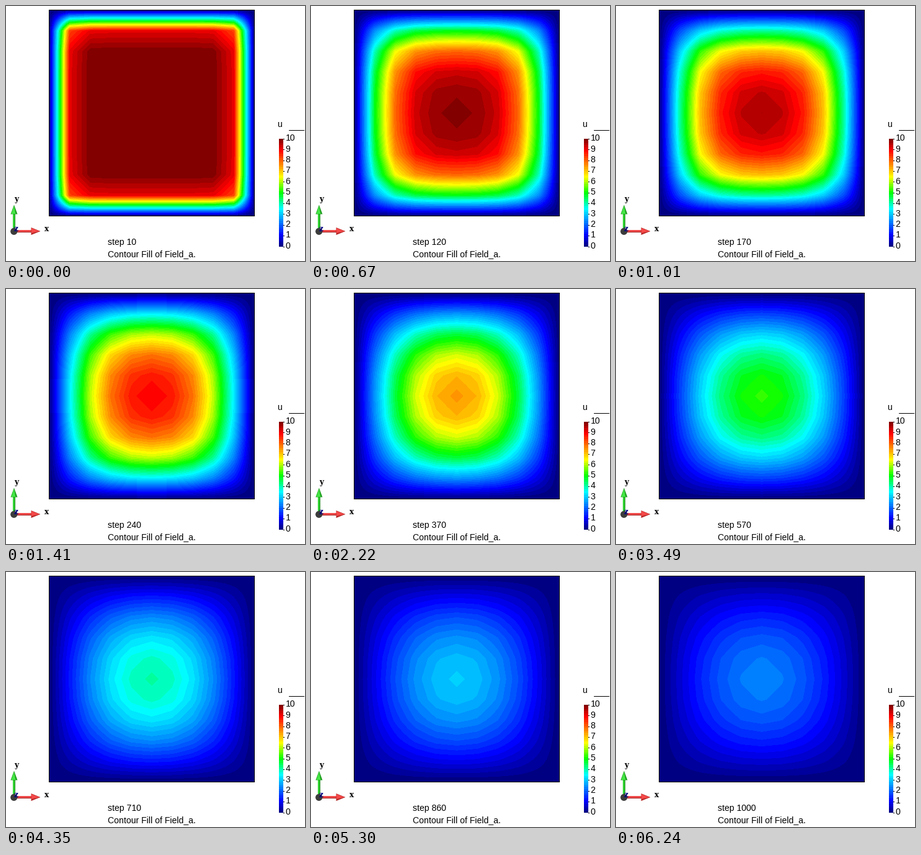
These frames come from a looping animation (482x411 px, 6750 ms). A matplotlib script:

```python
import math

import matplotlib.pyplot as plt
import numpy as np
from matplotlib.animation import FuncAnimation
from matplotlib.patches import Circle, Polygon, Rectangle

W, H, DPI = 482, 411, 64
INTERVAL, FRAMES = 30, 225

# Square plate on the stage, border included (pixels)
LEFT, TOP, PLATE_W, PLATE_H = 69, 6, 332, 333
CELLS = 10
DIFFUSION = 9.8e-5          # diffusion per solver step, unit square
SHOWN_MS = 67.05            # time one result stays on screen
BANDS = 50

STOPS = [0, 0.1, 0.35, 0.5, 0.65, 0.9, 1]
RED = [0, 0, 0, 0, 255, 255, 130]
GREEN = [0, 0, 255, 255, 255, 0, 0]
BLUE = [130, 255, 255, 0, 0, 0, 0]
levels = np.linspace(0, 1, BANDS)
PALETTE = np.stack([np.interp(levels, STOPS, c) for c in (RED, GREEN, BLUE)],
                   axis=1).round().astype(np.uint8)


def colorize(u):
    """Map values 0..1 to flat colour bands."""
    return PALETTE[np.clip((u * BANDS + 1e-9).astype(int), 0, BANDS - 1)]


def cooling_profile(step):
    """Nodal values of a 1D bar cooling from 1 with both ends held at 0."""
    nodes = np.arange(CELLS + 1)
    u = np.zeros(CELLS + 1)
    for k in range(1, CELLS, 2):
        angle = k * math.pi / CELLS
        rate = 2 * CELLS**2 * (1 - math.cos(angle))
        amp = 2 / CELLS / math.tan(angle / 2)
        u += amp * np.sin(angle * nodes) * math.exp(-rate * DIFFUSION * step)
    return u


def plate_image(step):
    nodes = np.arange(CELLS + 1)
    bar = cooling_profile(step)
    across = np.interp(np.linspace(0, CELLS, PLATE_W), nodes, bar)
    down = np.interp(np.linspace(0, CELLS, PLATE_H), nodes, bar)
    img = colorize(np.outer(down, across))
    img[[0, -1], :] = 0
    img[:, [0, -1]] = 0
    return img


def step_at(frame):
    """Results run at 16 per second but are shown 15 per second."""
    shown = int((frame * INTERVAL + 20) / SHOWN_MS)
    return 10 * min(100, 1 + -(-shown * 16 // 15))


fig = plt.figure(figsize=(W / DPI, H / DPI), dpi=DPI, facecolor="white")
ax = fig.add_axes([0, 0, 1, 1])
ax.axis("off")


def picture(img, x, y):
    h, w = img.shape[:2]
    return ax.imshow(img, extent=(x, x + w, y + h, y), aspect="auto",
                     interpolation="nearest")


def label(x, y, text, px=14, **style):
    style = {"family": "Liberation Sans", "color": "black", **style}
    return ax.text(x, y, text, fontsize=px * 72 / DPI, va="baseline", **style)


def rect(x, y, w, h, color):
    ax.add_patch(Rectangle((x, y), w, h, fc=color, ec="none", aa=False))


def shape(points, color):
    ax.add_patch(Polygon(points, fc=color, ec="none"))


def draw_legend():
    values = 1 - (np.arange(174) + 0.5) / 174
    picture(np.repeat(colorize(values)[:, None], 7, axis=1), 440, 214)
    for i in range(11):
        y = 214 + 17.35 * i
        rect(447, round(y), 2, 1, "black")
        label(450.5, y + 3.2, str(10 - i))
    label(437, 195, "u")
    rect(456, 200, 25, 1, "black")


def draw_triad():
    rect(11, 335, 4, 24, "#35d435")
    rect(14, 335, 1, 24, "#168a16")
    shape([(7.5, 335.5), (18.5, 335.5), (13, 320.5)], "#1c9c1c")
    shape([(8.5, 335), (15.5, 335), (13, 322)], "#45e645")

    rect(17, 361, 25, 4, "#f04a4a")
    rect(17, 364, 25, 1, "#a01c1c")
    shape([(40.5, 357), (40.5, 369), (55.5, 363)], "#b52626")
    shape([(41, 358), (41, 366), (54, 363)], "#f54848")

    ax.add_patch(Circle((12.8, 363.3), 5.6, fc="#3c3c3c", ec="none"))
    bold = {"family": "DejaVu Serif", "weight": "bold"}
    label(13, 314.5, "y", 12, **bold)
    label(62, 363, "x", 12, **bold)
    label(13, 363, "z", 12, **{**bold, "color": "#000080"})


plate = picture(plate_image(10), LEFT, TOP)
draw_legend()
draw_triad()
step_text = label(164, 385, "step 10")
label(164, 404, "Contour Fill of Field_a.")
ax.set_xlim(0, W)
ax.set_ylim(H, 0)


def update(frame):
    step = step_at(frame)
    plate.set_data(plate_image(step))
    step_text.set_text(f"step {step}")
    return plate, step_text


anim = FuncAnimation(fig, update, frames=FRAMES, interval=INTERVAL,
                     repeat=True, repeat_delay=0)
plt.show()
```
